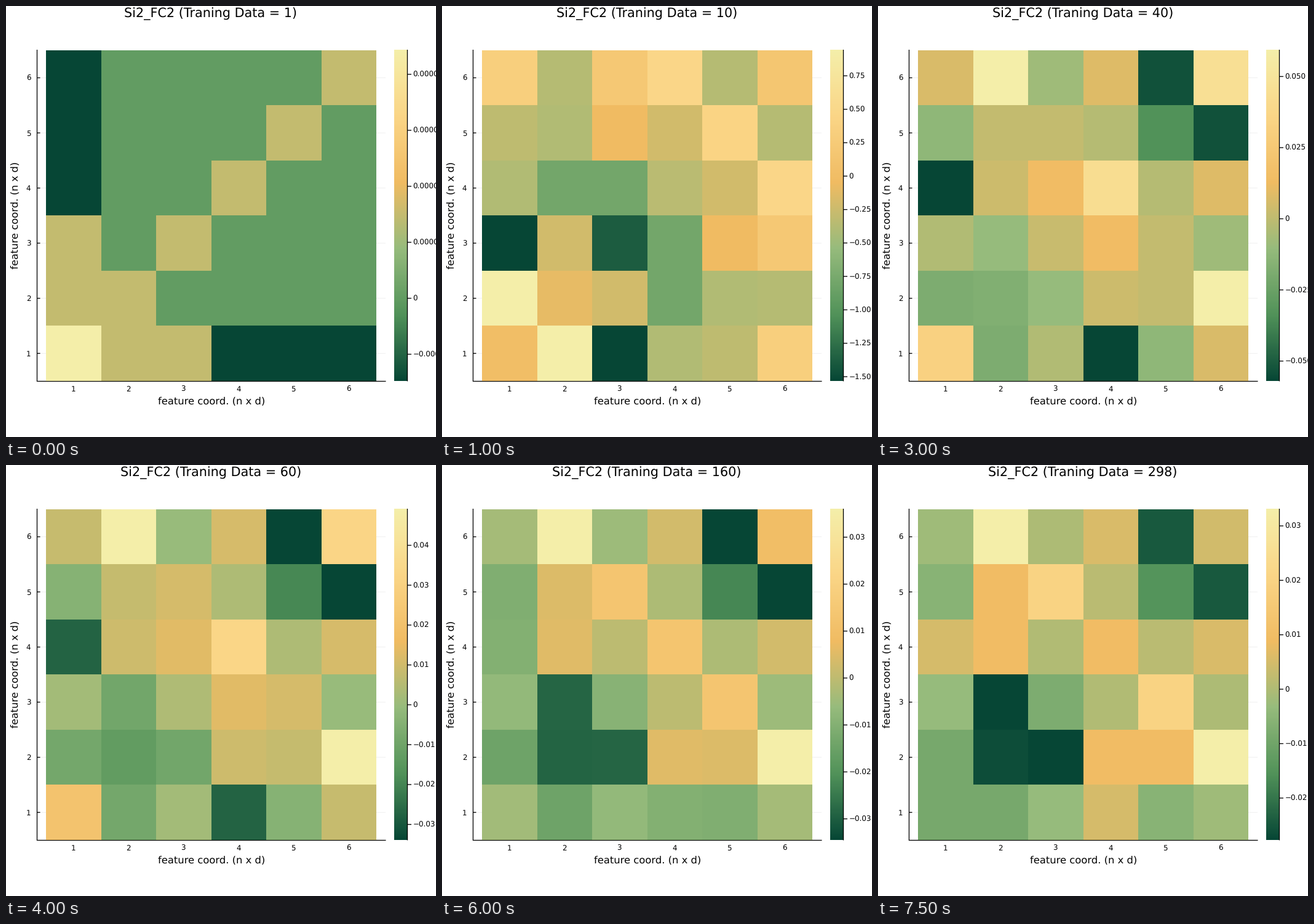
A matplotlib script that plays this animation: 699 by 700 pixels, repeating every 8000 ms.

```python
import numpy as np
import matplotlib.pyplot as plt
from matplotlib.animation import FuncAnimation
from matplotlib.colors import LinearSegmentedColormap

W, H, DPI = 699, 700, 100
N = 6
LEFT, RIGHT, TOP, BOTTOM = 65, 602.2, 71.5, 609
CELL = (RIGHT - LEFT) / N
COUNTS = [1, 5, 10, 15, 20, 30, 40, 50, 60, 80, 100, 120, 160, 200, 250, 298]

plt.rcParams["font.family"] = "DejaVu Sans"
plt.rcParams["text.hinting"] = "none"

CMAP = LinearSegmentedColormap.from_list(
    "meadow", ["#064635", "#519259", "#96bb7c", "#f0bb62", "#fad586", "#f4eea9"], N=512)

UPPER = np.triu_indices(N)


def first_fit():
    """One sample only: a diagonal plus a first row that splits in two halves."""
    m = 25 * (1 + np.eye(N))
    m[0, :N // 2], m[0, N // 2:] = 50, 0
    m[0, 0] = 100
    return m[UPPER]


# Symmetric matrices at a few sample counts, as percent of the colour range;
# the fits between them drift with the logarithm of the count.
FITS = {
    1: first_fit(),
    10: [62, 100, 0, 46, 49, 75, 58, 53, 30, 46, 47, 6, 30, 60, 70, 48, 53, 81, 79, 47, 68],
    20: [42, 20, 8, 3, 36, 14, 61, 48, 10, 33, 100, 70, 30, 36, 67, 1, 52, 32, 36, 0, 88],
    40: [77, 33, 46, 0, 38, 55, 34, 40, 52, 50, 100, 51, 61, 50, 42, 86, 47, 56, 20, 3, 88],
    298: [31, 31, 40, 54, 36, 42, 2, 0, 61, 61, 100, 33, 46, 78, 45, 61, 48, 55, 21, 5, 53],
}

# Low and high end of the colour bar.
LIMITS = {
    1: (-2.956e-5, 8.868e-5), 10: (-1.532, 0.943), 20: (-0.0917, 0.1034),
    40: (-0.0570, 0.0593), 60: (-0.0339, 0.0491), 160: (-0.0345, 0.0360),
    298: (-0.0277, 0.0331),
}


def at_count(keyed, count):
    columns = np.array(list(keyed.values()), float).T
    logs = np.log(list(keyed))
    return np.array([np.interp(np.log(count), logs, c) for c in columns])


def matrix(count):
    values = at_count(FITS, count)
    m = np.zeros((N, N))
    m[UPPER] = (values - values.min()) / np.ptp(values)
    return np.maximum(m, m.T)


def tick_step(span):
    """Tick spacing and number of decimals."""
    if span > 0.5:
        return 0.25, 2
    if span > 0.09:
        return 0.025, 3
    if span > 0.01:
        return 0.01, 2
    return 0.00002, 5


def px(size):
    return size * 72 / DPI


fig = plt.figure(figsize=(W / DPI, H / DPI), dpi=DPI, facecolor="white")
ax = fig.add_axes([0, 0, 1, 1])
ax.axis("off")


def line(xs, ys, color="black", width=1.3, z=1):
    return ax.plot(xs, ys, color=color, lw=px(width), solid_capstyle="butt",
                   snap=False, zorder=z)[0]


def label(x, y, text, size=11.85, ha="center", **kw):
    return ax.text(x, y, text, fontsize=px(size), ha=ha, va="baseline", color="black", **kw)


def mesh(xs, ys, values):
    return ax.pcolormesh(xs, ys, values, cmap=CMAP, vmin=0, vmax=1,
                         antialiased=False, zorder=2)


for i in range(N):
    cx, cy = LEFT + CELL * (i + 0.5), BOTTOM - CELL * (i + 0.5)
    line([50, 617], [cy, cy], "#f0f0f0", 1, 0)
    line([50, 55.5], [cy, cy])
    label(cx - 0.6, 626.2, str(i + 1))
    label(40.3, cy + 4.3, str(i + 1), ha="right")
line([50.5, 50.5], [71, 610])
line([50, 617.5], [609.5, 609.5])
line([652.5, 652.5], [71, 609.5], z=3)
label(334, 647, "feature coord. (n x d)", 16.4)
label(20, 339.6, "feature coord. (n x d)", 16.4, rotation=90, rotation_mode="anchor")
title = label(333, 18, "", 20.8)

cells = mesh(np.round(np.linspace(LEFT, RIGHT, N + 1)),
             np.round(np.linspace(BOTTOM, TOP + 0.1, N + 1)), np.zeros((N, N)))
mesh([631, 652], np.linspace(BOTTOM, 71, 270), np.linspace(0, 1, 269)[:, None])

bar_marks = [(line([], [], z=3), label(661.3, 0, "", ha="left")) for _ in range(14)]

ax.set_xlim(0, W)
ax.set_ylim(H, 0)


def update(step):
    count = COUNTS[step]
    title.set_text(f"Si2_FC2 (Traning Data = {count})")
    cells.set_array(matrix(count))

    low, high = at_count(LIMITS, count)
    gap, decimals = tick_step(high - low)
    first = int(np.ceil(low / gap))
    for k, (tick, text) in enumerate(bar_marks, first):
        value = k * gap
        tick.set_visible(value <= high)
        text.set_visible(value <= high)
        y = BOTTOM - (value - low) / (high - low) * (BOTTOM - TOP)
        tick.set_data([652, 659], [y, y])
        text.set_y(y + 4.3)
        text.set_text(f"{value:.{decimals}f}".replace("-", "\u2212") if k else "0")
    return [title, cells]


anim = FuncAnimation(fig, update, frames=len(COUNTS), interval=500,
                     repeat=True, repeat_delay=0, blit=False)
plt.show()
```
